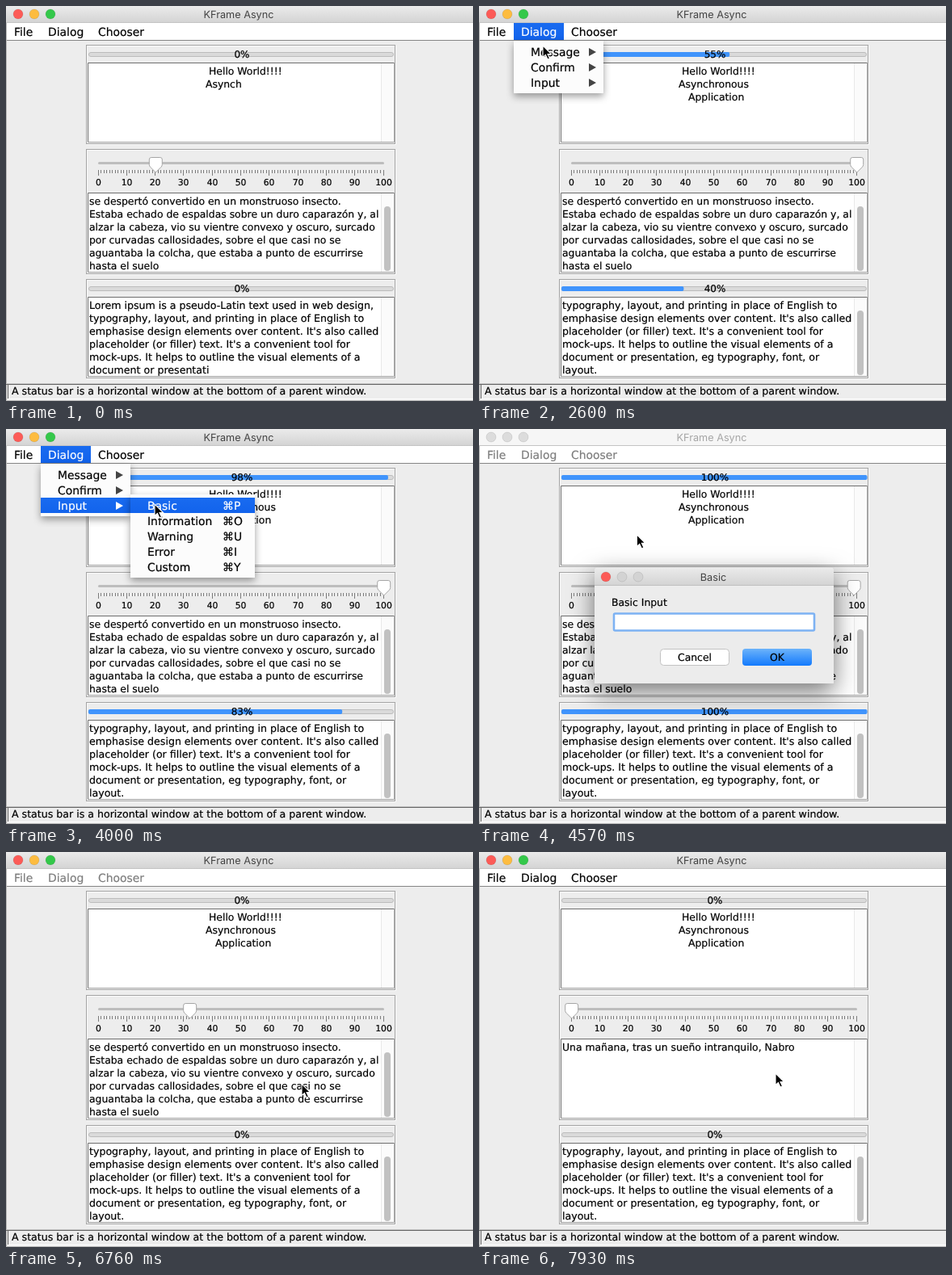
An HTML page that plays this animation: 578 px wide and 489 px high, repeating every 7990 ms.

```html
<!DOCTYPE html>
<html lang="en">
<head>
<meta charset="utf-8">
<title>KFrame Async</title>
<style>
html, body { margin: 0; width: 100%; height: 100%; overflow: hidden; background: #ededed; }
svg { display: block; width: 578px; height: 489px; }
text { font-family: "DejaVu Sans", sans-serif; font-size: 12.4px; color: #000; fill: currentColor; stroke: currentColor; stroke-width: .2px; text-rendering: geometricPrecision; }
.title { font-family: Inter, Roboto, sans-serif; font-size: 12.7px; color: #444; stroke: none; text-anchor: middle; }
.menu text { font-size: 13.9px; }
.lorem text, .status { font-size: 12.6px; }
.percent, .scale text { font-size: 12px; text-anchor: middle; }
.scale text { font-size: 10.8px; }
.scale path { stroke: #7c7c7c; fill: none; }
.mid { text-anchor: middle; }
.group { fill: none; stroke: #a3a3a3; }
.track { fill: #dadada; stroke: #bcbcbc; }
.thumb { fill: #c1c1c1; }
.blue { fill: #4094fc; }
.popup { filter: drop-shadow(0 4px 5px rgba(0,0,0,.38)); fill: #fcfcfc; }
.dialog { filter: drop-shadow(0 10px 15px rgba(0,0,0,.55)); }
.light { stroke: rgba(0,0,0,.12); stroke-width: .8px; }
.arrow { fill: #444; }
.on text, text.on { color: #fff; }
.on .arrow { fill: #fff; }
.inactive .title { color: #a6a6a6; }
.inactive .light { fill: #dcdcdc; }
.dim text { color: #7d7d7d; }
</style>
</head>
<body>
<svg viewBox="0 0 578 489">
  <defs>
    <linearGradient id="chrome" x2="0" y2="1"><stop stop-color="#ebebeb"/><stop offset="1" stop-color="#d4d4d4"/></linearGradient>
    <linearGradient id="select" x2="0" y2="1"><stop stop-color="#196bf0"/><stop offset="1" stop-color="#1263ec"/></linearGradient>
    <linearGradient id="primary" x2="0" y2="1"><stop stop-color="#6cb3fa"/><stop offset="1" stop-color="#137afd"/></linearGradient>
  </defs>
  <rect width="578" height="489" fill="#ededed"/>

  <g id="window">
    <rect id="titleBar" width="578" height="20" fill="url(#chrome)"/>
    <circle class="light" cx="15" cy="10" r="6" fill="#fc5b57"/>
    <circle class="light" cx="35" cy="10" r="6" fill="#fdbc40"/>
    <circle class="light" cx="55" cy="10" r="6" fill="#34c84a"/>
    <text class="title" x="288" y="15">KFrame Async</text>
    <path d="M0 20.5H578" stroke="#c4c4c4"/>
  </g>
  <rect y="21" width="578" height="21" fill="#fff"/>
  <path d="M0 42.5H578" stroke="#858585"/>
  <path d="M.5 21V489" stroke="#b5b5b5"/>
  <rect id="menuMark" x="43" y="21" width="62" height="21" fill="url(#select)"/>
  <g id="menuBar" class="menu">
    <text x="10" y="37">File</text>
    <text id="dialogMenu" x="52" y="37">Dialog</text>
    <text x="114" y="37">Chooser</text>
  </g>

  <g id="panels"></g>
  <g id="hello"></g>
  <g id="spanish"></g>
  <g id="lorem" class="lorem"></g>

  <g id="slider">
    <rect x="114" y="193" width="354" height="3" rx="1.5" fill="#bdbdbd"/>
    <g id="scale" class="scale"></g>
    <path id="knob" d="M-8 190Q-8 187.5-5.5 187.5H5.5Q8 187.5 8 190V196.5Q8 198 6.5 199.5L0 206L-6.5 199.5Q-8 198-8 196.5Z" fill="#fff" stroke="#a6a6a6"/>
  </g>

  <path d="M0 468.5H578M2.5 469V486" stroke="#666" fill="none"/>
  <path d="M0 467.5H578" stroke="#c4c4c4"/>
  <path d="M2 486.5H578" stroke="#fff"/>
  <path d="M0 488.5H578" stroke="#bbb"/>
  <text class="status" x="7" y="481">A status bar is a horizontal window at the bottom of a parent window.</text>

  <g id="mainMenu" class="menu"><rect class="popup" x="43" y="43" width="111" height="65"/></g>
  <g id="subMenu" class="menu"><rect class="popup" x="154" y="81" width="154" height="103"/></g>

  <g id="dialog">
    <path class="dialog" d="M143 315V176Q143 171 148 171H434Q439 171 439 176V315Z" fill="#ececec"/>
    <path d="M143 193V176Q143 171 148 171H434Q439 171 439 176V193Z" fill="url(#chrome)"/>
    <path d="M143 193.5H439" stroke="#bfbfbf"/>
    <circle class="light" cx="157" cy="183" r="6" fill="#fc5b57"/>
    <circle class="light" cx="177" cy="183" r="6" fill="#d3d3d3"/>
    <circle class="light" cx="197" cy="183" r="6" fill="#d3d3d3"/>
    <text class="title" x="290" y="188">Basic</text>
    <text x="164" y="219">Basic Input</text>
    <rect x="167" y="228.5" width="248" height="21" rx="1.5" fill="#fff" stroke="#7db2f3" stroke-width="2.6"/>
    <rect x="224.5" y="272.5" width="85" height="20" rx="4" fill="#fff" stroke="#c3c3c3"/>
    <rect id="ok" x="326" y="272" width="86" height="21" rx="4" fill="url(#primary)"/>
    <text class="mid" x="267" y="287">Cancel</text>
    <text class="mid" x="369" y="287">OK</text>
  </g>

  <path id="cursor" d="M0 0V14.5L3.4 11.4L6 17L8.5 15.9L6 10.5H10.5Z" fill="#000" stroke="#fff" stroke-width="1.1"/>
</svg>

<script>
const LOOP = 7990;
const $ = id => document.getElementById(id);
const add = (id, markup) => $(id).insertAdjacentHTML('beforeend', markup);
const clamp = (v, lo, hi) => Math.min(hi, Math.max(lo, v));
const show = (id, on) => { $(id).style.display = on ? '' : 'none'; };
const within = (t, from, to) => t >= from && t < to;

const LOREM = [
  'Lorem ipsum is a pseudo-Latin text used in web design,',
  'typography, layout, and printing in place of English to',
  "emphasise design elements over content. It's also called",
  "placeholder (or filler) text. It's a convenient tool for",
  'mock-ups. It helps to outline the visual elements of a',
  'document or presentation, eg typography, font, or',
  'layout.'
];
const SPANISH = [
  'se despertó convertido en un monstruoso insecto.',
  'Estaba echado de espaldas sobre un duro caparazón y, al',
  'alzar la cabeza, vio su vientre convexo y oscuro, surcado',
  'por curvadas callosidades, sobre el que casi no se',
  'aguantaba la colcha, que estaba a punto de escurrirse',
  'hasta el suelo'
];
const OPENING = 'Una mañana, tras un sueño intranquilo, Nabro';

function addPanel(top, bottom, areaTop, thumb) {
  const height = bottom - top, areaHeight = bottom - 1 - areaTop;
  add('panels', `
    <rect class="group" x="100.5" y="${top + 1.5}" width="382" height="${height}" style="stroke:#fafafa"/>
    <rect class="group" x="99.5" y="${top + .5}" width="382" height="${height}"/>
    <rect x="101" y="${areaTop}" width="380" height="${areaHeight}" fill="#fff"/>
    <rect x="464" y="${areaTop}" width="16" height="${areaHeight}" fill="#fbfbfb"/>
    <path d="M464.5 ${areaTop}v${areaHeight}" stroke="#e9e9e9"/>
    <path d="M101.5 ${bottom - 1}V${areaTop + .5}H481" stroke="#6e6e6e" fill="none"/>
    <path d="M101 ${bottom - 1.5}H480.5V${areaTop}" stroke="#a5a5a5" fill="none"/>`);
  if (thumb) add('panels', `<rect id="${thumb}" class="thumb" x="468" y="${bottom - 83}" width="8" height="80" rx="4"/>`);
}

function addBar(name, y) {
  add('panels', `
    <rect class="track" x="102.5" y="${y + .5}" width="377" height="5" rx="2.5"/>
    <rect id="${name}Fill" class="blue" x="102" y="${y}" height="6" rx="2"/>
    <text id="${name}Text" class="percent" x="292" y="${y + 7}"></text>`);
}

function addLines(id, xs, y, count) {
  for (let i = 0; i < count; i++) add(id, `<text x="${xs[i] ?? 103}" y="${y + 16 * i}"></text>`);
}

function setLines(id, lines) {
  [...$(id).children].forEach((el, i) => {
    const line = lines[i] || '';
    if (el.textContent !== line) el.textContent = line;
  });
}

addPanel(48, 170, 70);
addPanel(177, 331, 231, 'spanishThumb');
addPanel(338, 460, 360, 'loremThumb');
addBar('first', 57);
addBar('second', 347);
addLines('hello', [251, 247, 259], 85, 3);
addLines('spanish', [], 246, 6);
addLines('lorem', [], 375, 6);

const scaleX = v => 114 + v * 3.53;
for (let v = 0; v <= 100; v++) {
  const x = Math.floor(scaleX(v)) + .5;
  add('scale', `<path d="M${x} 203V${v % 10 ? 207 : 210}"/>`);
  if (v % 10 === 0) add('scale', `<text x="${x}" y="222">${v}</text>`);
}

['Message', 'Confirm', 'Input'].forEach((label, i) => {
  const y = 47 + 19 * i;
  add('mainMenu', `<g id="item${i}"><rect x="43" y="${y - 9 + 9}" width="111" height="19" fill="url(#select)"/>
    <text x="64" y="${y + 15}">${label}</text>
    <path class="arrow" d="M136 ${y + 5}L145 ${y + 10}L136 ${y + 15}Z"/></g>`);
});
['Basic P', 'Information O', 'Warning U', 'Error I', 'Custom Y'].forEach((entry, i) => {
  const [label, key] = entry.split(' '), y = 85 + 19 * i;
  add('subMenu', `<g id="sub${i}"><rect x="154" y="${y}" width="154" height="19" fill="url(#select)"/>
    <text x="175" y="${y + 15}">${label}</text><text x="268" y="${y + 15}">⌘${key}</text></g>`);
});

function highlight(id, on) {
  $(id).classList.toggle('on', on);
  $(id).firstElementChild.style.display = on ? '' : 'none';
}

function setBar(name, value) {
  $(name + 'Fill').setAttribute('width', value * 3.785);
  $(name + 'Text').textContent = value + '%';
}

const typed = (text, t, from, step, ready = 0) =>
  text.slice(0, clamp(ready + Math.floor((t - from) / step), ready, text.length));
const percent = (t, from) => Math.floor(clamp((t - from) * .0307, 0, 100));

// time, x, y of the pointer tip
const PATH = [
  [400, 582, 492], [850, 446, 349], [1430, 329, 289], [1600, 329, 289],
  [2250, 74, 31], [2450, 75, 32], [2600, 79, 49], [3050, 88, 92], [3300, 92, 93],
  [3850, 184, 93], [4250, 184, 93], [5290, 234, 260], [5480, 234, 260],
  [6100, 367, 275], [6410, 367, 275], [6700, 366, 287], [7000, 366, 287], [7500, 367, 274]
];
function pointerAt(t) {
  const next = PATH.findIndex(p => p[0] > t);
  if (next === 0) return [600, 500];
  if (next < 0) return PATH[PATH.length - 1].slice(1);
  const a = PATH[next - 1], b = PATH[next];
  const k = (t - a[0]) / (b[0] - a[0]), e = k * k * (3 - 2 * k);
  return [a[1] + (b[1] - a[1]) * e, a[2] + (b[2] - a[2]) * e];
}

function render(t) {
  const [px, py] = pointerAt(t);
  $('cursor').setAttribute('transform', `translate(${px} ${py})`);

  setLines('hello', ['Hello World!!!!', typed('Asynchronous', t, 0, 33.5, 6), typed('Application', t, 435, 33.5)]);
  setBar('first', t < 5480 ? percent(t, 805) : 0);
  setBar('second', t < 5250 ? percent(t, 1292) : 0);

  const tail = typed(LOREM[5] + LOREM[6], t, 0, 22, 'document or presentati'.length);
  const lastLine = tail.slice(LOREM[5].length);
  const lines = [...LOREM.slice(0, 5), tail.slice(0, LOREM[5].length), lastLine];
  setLines('lorem', lastLine ? lines.slice(1) : lines);
  show('loremThumb', lastLine);

  const retyping = t >= 6940;
  setLines('spanish', retyping ? [typed(OPENING, t, 6940, 22)] : SPANISH);
  show('spanishThumb', !retyping);

  const value = t < 4570 ? Math.min(100, 20 + t * .0309) : Math.max(0, 100 - (t - 4570) * .0309);
  $('knob').setAttribute('transform', `translate(${scaleX(Math.floor(value)) + .7} 0)`);

  const menuOpen = within(t, 2300, 4240);
  show('menuMark', menuOpen);
  $('dialogMenu').classList.toggle('on', menuOpen);
  show('mainMenu', menuOpen);
  const subOpen = menuOpen && t >= 3250;
  show('subMenu', subOpen);
  const row = t < 2640 ? -1 : Math.floor((py - 47) / 19);
  for (let i = 0; i < 3; i++) highlight('item' + i, row === i);
  for (let i = 0; i < 5; i++) highlight('sub' + i, i === 0 && subOpen && px > 156);

  const modal = within(t, 4500, 6640);
  show('dialog', modal);
  $('ok').style.filter = within(t, 6410, 6640) ? 'brightness(.85)' : '';
  $('window').classList.toggle('inactive', modal);
  $('titleBar').setAttribute('fill', modal ? '#f6f6f6' : 'url(#chrome)');
  $('menuBar').classList.toggle('dim', within(t, 4500, 6820));
}

const start = performance.now();
function tick() {
  render((performance.now() - start) % LOOP);
  requestAnimationFrame(tick);
}
tick();
</script>
</body>
</html>
```
